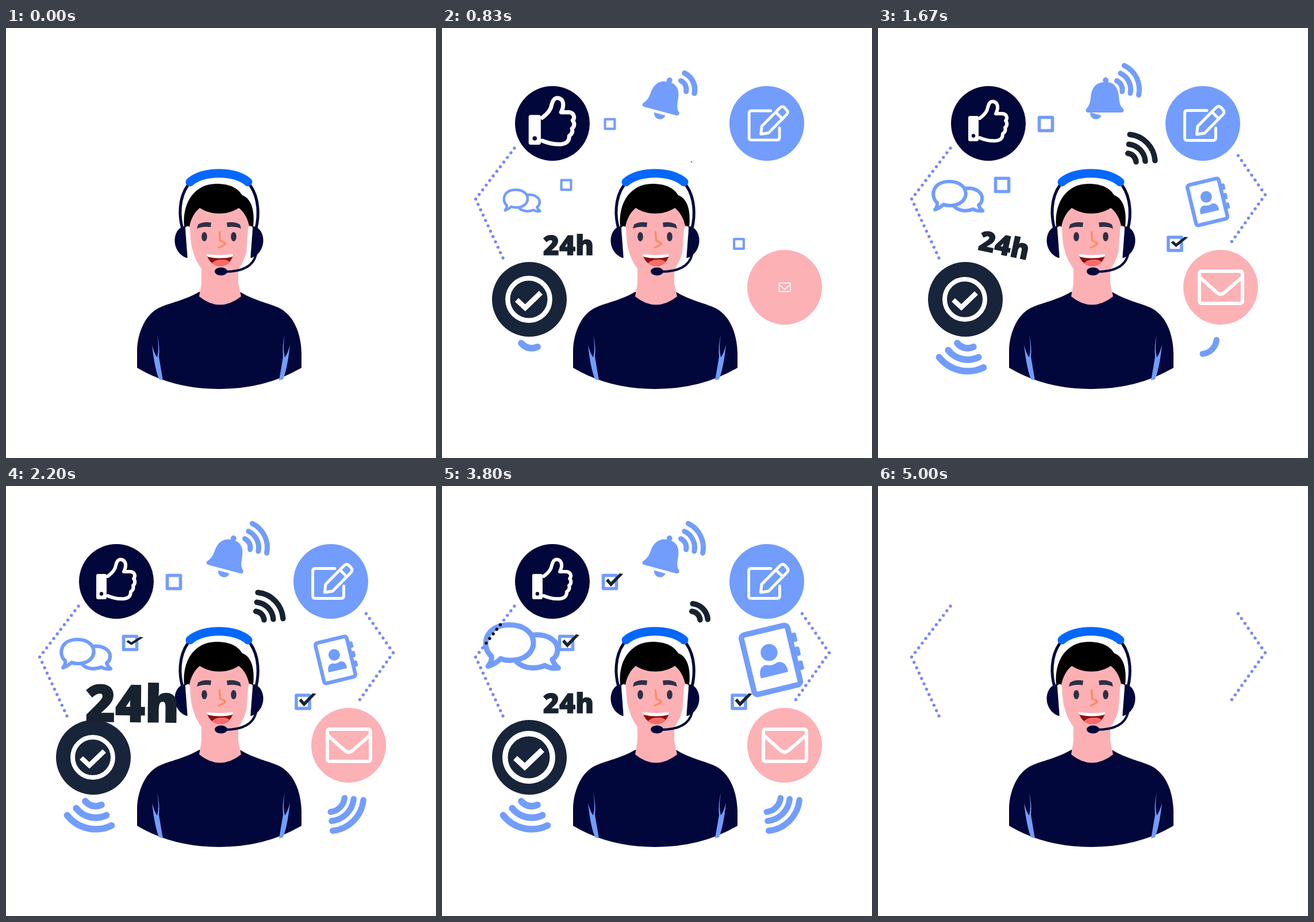
Animation of 748x748 px, one loop 5.06 s. Source, as an HTML page:

```html
<!DOCTYPE html>
<html lang="en">
<head>
<meta charset="utf-8">
<title>Customer support</title>
<style>
  html, body { margin: 0; width: 100%; height: 100%; overflow: hidden; background: #fff; }
  svg { display: block; width: 100vw; height: 100vh; }
  .line { fill: none; stroke: #fff; stroke-linecap: round; stroke-linejoin: round; }
  .blue { fill: #729dfd; }
  .blueLine { fill: none; stroke: #729dfd; stroke-linejoin: round; stroke-linecap: round; }
  .navy { fill: #01063b; }
  .wire { fill: none; stroke: #01063b; stroke-linecap: round; }
  text { font: 800 48px "Open Sans", "Noto Sans", sans-serif; fill: #18222f; stroke: #18222f; stroke-width: 1.2px; text-anchor: middle; }
</style>
</head>
<body>
<svg viewBox="0 0 748 748">
  <defs>
    <path id="accent" class="blue" d="M263 533Q267 558 263 573Q258 567 254 551Q258 590 266 611L273 613Q269 590 266 572Q268 555 263 533Z"/>
    <g id="ear">
      <path class="navy" d="M309 345C288 351 287 390 314 400L318 399L313 346Z"/>
      <path fill="#fff" stroke="#f3dfe6" stroke-width=".6" d="M312 347Q319 341 320 351L323 394Q323 402 316 400Z"/>
    </g>
    <g id="look" fill="#2d3048">
      <path d="M332 349L334 342C341 337 350 337 357 338.500L356 346.500C347 345 340 346 332 349Z"/>
      <ellipse cx="345" cy="363" rx="4.800" ry="8"/>
    </g>
  </defs>

  <g id="man">
    <path class="navy" d="M336 459C310 474 285 478 268 486C240 498 228 535 228 562V591Q290 628 371 628Q452 628 514 591V565C513 530 500 498 473 486C455 478 432 474 407 459Z"/>
    <use href="#accent"/>
    <use href="#accent" transform="matrix(-1 0 0 1 748 0)"/>
    <path fill="#fcb0b4" d="M340 405V444L336 467Q372 496 409 467L404 444V405Z"/>
    <path fill="#fcb0b4" d="M319 335C319 380 328 404 341 420H404C416 404 424 380 424 335C416 305 395 295 371 295C345 295 326 310 319 335Z"/>
    <path d="M310 346C306 304 328 271 366 271C392 271 404 280 411 291C428 297 433 320 430 346L423 344C420 330 413 319 405 313C385 326 357 326 337 313C328 320 321 333 319 346Z"/>
    <path class="wire" stroke-width="5" d="M316 274C300 297 301 328 307 349M425 274C441 297 440 328 435 349"/>
    <path fill="none" stroke="#0468fe" stroke-width="15" stroke-linecap="round" d="M320 268C342 247.500 399 247.500 421 268"/>
    <use href="#ear"/>
    <use href="#ear" transform="matrix(-1 0 0 1 741 0)"/>
    <use href="#look"/>
    <use href="#look" transform="matrix(-1 0 0 1 741 0)"/>
    <path fill="none" stroke="#fc8c60" stroke-width="3.400" stroke-linecap="round" d="M371.500 355L372.500 370Q383 374 381 376Q376 380 370 382"/>
    <path fill="#8a1111" d="M349 393Q372 400 396 393C392 408 383 414 373 414C362 414 352 407 349 393Z"/>
    <path fill="#fb6a6a" d="M358 409Q366 402 374 403Q384 402 389 407Q382 414 373 414Q364 414 358 409Z"/>
    <path fill="#fff" d="M348 393Q372 397 396 393L394 398Q372 403 351 398Z"/>
    <path class="wire" stroke-width="4" d="M435 394C430 415 410 424 380 424"/>
    <ellipse class="navy" cx="374" cy="423.500" rx="11" ry="7"/>
  </g>

  <g id="discs">
    <circle cx="152" cy="472" fill="#18243a"/>
    <circle cx="192" cy="166" fill="#01063b"/>
    <circle cx="565" cy="166" fill="#729dfd"/>
    <circle cx="596" cy="451" fill="#fcb1b5"/>
  </g>

  <g id="ring">
    <circle class="line" cx="151" cy="472" r="35" stroke-width="8"/>
    <path fill="none" stroke="#fff" stroke-width="8.500" d="M131 473L145 486L171 461"/>
  </g>
  <g id="thumb">
    <rect x="157" y="153" width="18" height="44" rx="3" fill="#fff"/>
    <circle class="navy" cx="166" cy="187.500" r="3.200"/>
    <path class="line" stroke-width="6" d="M177 157C184 152 190 146 191 138C193 130 196 127 201 128C209 130 210 139 205 149H217C224 150 226 157 222 161C226 166 224 171 221 173C223 179 220 182 217 184C217 192 213 195 206 196C194 197 186 195 177 191"/>
  </g>
  <g id="pencil" class="line" stroke-width="5">
    <path d="M572 143.500H538Q533.500 143.500 533.500 148V191.500Q533.500 195.500 538 195.500H583Q587.500 195.500 587.500 191V174"/>
    <path d="M554.500 185L556 171L588 138.500Q592 134 596.500 138L600 142Q604 146 600 150.500L568 183ZM581 146L593 158"/>
  </g>
  <g id="mail" class="line" stroke-width="6">
    <rect x="559" y="423" width="75" height="56" rx="4"/>
    <path d="M559 433L588 459Q596 467 604 459L634 433"/>
  </g>

  <g id="chat" class="blueLine" stroke-width="6.200">
    <path d="M151 279C171 277 182 287 181 297C181 302 178 306 175 308Q177 314 182 318Q172 319 166 315C151 321 136 317 130 307"/>
    <path fill="#fff" d="M103 304C90 293 95 267 124 267C162 267 162 309 125 309Q119 309 114 307Q108 313 99 316Q104 310 103 304Z"/>
  </g>
  <g id="dots"></g>

  <g id="book">
    <g transform="translate(573 302.500) rotate(-13.500)" class="blue">
      <rect class="blueLine" x="-28" y="-36" width="56" height="72" rx="4" stroke-width="6.500"/>
      <rect x="29" y="-25" width="7" height="11" rx="2"/>
      <rect x="29" y="-8" width="7" height="11" rx="2"/>
      <rect x="29" y="9" width="7" height="11" rx="2"/>
      <circle cx="0" cy="-9" r="10"/>
      <path d="M-16.500 18.500V14Q-15 4.500 -7 4.500Q0 8 7 4.500Q15 4.500 16.500 14V18.500Z"/>
    </g>
  </g>

  <g id="bell" class="blue">
    <g id="dome">
      <circle cx="396" cy="91" r="5"/>
      <path d="M394 94C376 95 371 108 370 121C369 133 365 138 362 141Q360 147 366 147H422Q429 147 427 141C421 136 420 130 419 120C418 104 411 94 396 94Z"/>
    </g>
    <path id="clapper" d="M386 152H406A10 9 0 0 1 386 152Z"/>
  </g>

  <g id="waves"></g>
  <g id="boxes"></g>
  <text id="hours" x="220" y="395">24h</text>
</svg>
<script>
const LOOP = 5060, POP = 400;
const $ = id => document.getElementById(id);
const clamp = x => Math.min(1, Math.max(0, x));

function add(parent, tag, attrs) {
  const el = document.createElementNS("http://www.w3.org/2000/svg", tag);
  for (const k in attrs) el.setAttribute(k, attrs[k]);
  return parent.appendChild(el);
}

// Eased value through [time, value] stops
function track(t, stops) {
  if (t <= stops[0][0]) return stops[0][1];
  for (let i = 1; i < stops.length; i++) {
    const [a, from] = stops[i - 1], [b, to] = stops[i];
    if (t < b) return from + (to - from) * (1 - Math.cos(Math.PI * (t - a) / (b - a))) / 2;
  }
  return stops[stops.length - 1][1];
}

function backOut(p) {
  const u = clamp(p) - 1;
  return 1 + 3.4 * u ** 3 + 2.4 * u * u;
}
const pop = (t, start, end) => backOut(t < end ? (t - start) / POP : 1 - (t - end) / POP);

function pose(el, x, y, scale, turn = 0) {
  el.setAttribute("display", scale > 0.005 ? "inline" : "none");
  el.setAttribute("transform", `translate(${x} ${y}) rotate(${turn}) scale(${scale}) translate(${-x} ${-y})`);
}

// Discs and their icons
const badges = [
  { id: "ring", x: 151, y: 472, on: 220, icon: 496, leave: 3612, off: 4012 },
  { id: "thumb", x: 192.5, y: 162.5, on: 350, icon: 618, leave: 3790, off: 4190 },
  { id: "pencil", x: 567, y: 166, on: 440, icon: 718, leave: 3932, off: 4332 },
  { id: "mail", x: 596, y: 451, on: 540, icon: 810, leave: 4255, off: 4550 }
];
const discs = [...$("discs").children];

function drawBadges(t) {
  badges.forEach((b, i) => {
    const grow = Math.sin(clamp((t - b.on) / 270) * Math.PI / 2);
    discs[i].setAttribute("r", 65 * grow * (1 - clamp((t - b.off) / 312) ** 2.7));
    pose($(b.id), b.x, b.y, pop(t, b.icon, b.leave));
  });
}

// Signal arcs spread outward from a centre and fold back the same way
const signals = [
  { x: 408, y: 107, radii: [17, 31.5, 46.5], from: -64, to: 12, width: 9, color: "#729dfd",
    reach: [[580, 0], [700, 17], [960, 46.5], [4140, 46.5], [4400, 17], [4840, 17], [4990, 0]] },
  { x: 433, y: 234, radii: [16, 32, 49], from: -84, to: -4, width: 9.5, color: "#18222f",
    reach: [[790, 0], [980, 16], [1300, 49], [3670, 49], [3970, 0]] },
  { x: 156, y: 534, radii: [23, 43, 63], from: 64, to: 142, width: 11.5, color: "#729dfd",
    reach: [[540, 0], [720, 23], [860, 23], [1320, 63], [4190, 63], [4480, 23], [4840, 23], [4990, 0]] },
  { x: 562, y: 540, radii: [27, 43, 60], from: 6, to: 84, width: 10.5, color: "#729dfd",
    reach: [[1420, 0], [1600, 27], [1680, 27], [2080, 60], [4200, 60], [4480, 27], [4840, 27], [4990, 0]] }
];
for (const s of signals) {
  s.arcs = s.radii.map(() => add($("waves"), "path", { fill: "none", stroke: s.color, "stroke-linecap": "round" }));
}

function drawSignals(t) {
  for (const s of signals) {
    const reach = track(t, s.reach);
    const at = (r, deg) => {
      const a = deg * Math.PI / 180;
      return `${s.x + r * Math.cos(a)} ${s.y + r * Math.sin(a)}`;
    };
    s.arcs.forEach((arc, i) => {
      const r = Math.min(reach, s.radii[i]);
      const shown = reach > (i ? s.radii[i - 1] + 0.3 : 0.3);
      arc.setAttribute("display", shown ? "inline" : "none");
      arc.setAttribute("d", `M${at(r, s.from)}A${r} ${r} 0 0 1 ${at(r, s.to)}`);
      arc.setAttribute("stroke-width", s.width * Math.min(1, r / s.radii[0]));
    });
  }
}

// Dotted brackets
function dotted(corners, counts, start, end) {
  const points = [corners[0]];
  counts.forEach((n, k) => {
    const [a, b] = [corners[k], corners[k + 1]];
    for (let i = 1; i <= n; i++) points.push([0, 1].map(c => a[c] + (b[c] - a[c]) * i / n));
  });
  return points.map(([x, y], i) => ({
    x, y, on: start + (end - start) * i / points.length,
    el: add($("dots"), "circle", { cx: x, cy: y, r: 2.7 })
  }));
}
const dots = [
  ...dotted([[126, 209], [58.5, 297.5], [106, 400]], [11, 11], 300, 820),
  ...dotted([[626.5, 222], [673.5, 290], [615.5, 371.5]], [8, 10], 1130, 1620)
];

function drawChat(t) {
  const swell = track(t, [[3400, 1], [3770, 1.48], [4150, 1]]);
  pose($("chat"), 139, 321, pop(t, 760, 4345) * swell);
  pose($("book"), 575, 302.5, pop(t, 1180, 4390) * swell);
  for (const d of dots) {
    const dx = d.x - 139 + 16 * swell, dy = d.y - 321 + 34 * swell;
    const inside = swell > 1.1 && Math.hypot(dx / 31, dy / 23) < swell;
    d.el.setAttribute("fill", inside ? "#05060c" : "#7b86f8");
    d.el.setAttribute("display", t >= d.on ? "inline" : "none");
  }
}

// Tick boxes
const boxes = [[516.5, 375.5, 1570], [216, 273, 2120], [292, 167, 2620]].map(([x, y, tick]) => {
  const el = add($("boxes"), "g", {});
  add(el, "rect", { x: x - 11.5, y: y - 11.5, width: 23, height: 23, fill: "#fff", stroke: "#729dfd", "stroke-width": 5.6, "stroke-linejoin": "round" });
  const mark = add(el, "path", { fill: "#18222f", d: `M${x - 7} ${y - 2}L${x - 3} ${y - 6}L${x + 2} ${y}L${x + 17} ${y - 15}L${x + 23} ${y - 14}L${x + 2} ${y + 8}Z` });
  return { x, y, tick, el, mark };
});

function drawBoxes(t) {
  for (const b of boxes) {
    pose(b.el, b.x, b.y, pop(t, 760, 4360));
    const open = clamp((t - b.tick) / 130);
    const cy = b.y - 3;
    b.mark.setAttribute("display", open ? "inline" : "none");
    b.mark.setAttribute("transform", `translate(0 ${cy}) scale(1 ${open}) translate(0 ${-cy})`);
  }
}

function drawBell(t) {
  let tilt = track(t, [[4120, 15], [4310, 22.5], [4500, 10]]);
  if (t > 1130 && t < 2210) tilt = 7.5 + 7.5 * Math.cos((t - 1130) / 360 * 2 * Math.PI);
  const hang = track(t, [[4120, 16], [4310, 33], [4500, 10]]);
  pose($("bell"), 396, 90, pop(t, 280, 4370));
  pose($("dome"), 396, 90, 1, tilt);
  pose($("clapper"), 396, 90, 1, hang);
}

function drawHours(t) {
  const swell = track(t, [[1690, 1], [2050, 1.9], [2400, 1.75], [2715, 2.1], [2915, 1]]);
  const turn = track(t, [[1130, 0], [1300, 12], [1480, -12], [1670, 12], [2050, -8], [2420, 16], [2740, 0]]);
  pose($("hours"), 220, 377, pop(t, 410, 4335) * swell, turn);
}

function frame(now) {
  const t = now % LOOP;
  drawBadges(t);
  drawSignals(t);
  drawChat(t);
  drawBoxes(t);
  drawBell(t);
  drawHours(t);
}

const start = performance.now();
function tick() {
  frame(performance.now() - start);
  requestAnimationFrame(tick);
}
tick();
</script>
</body>
</html>
```
